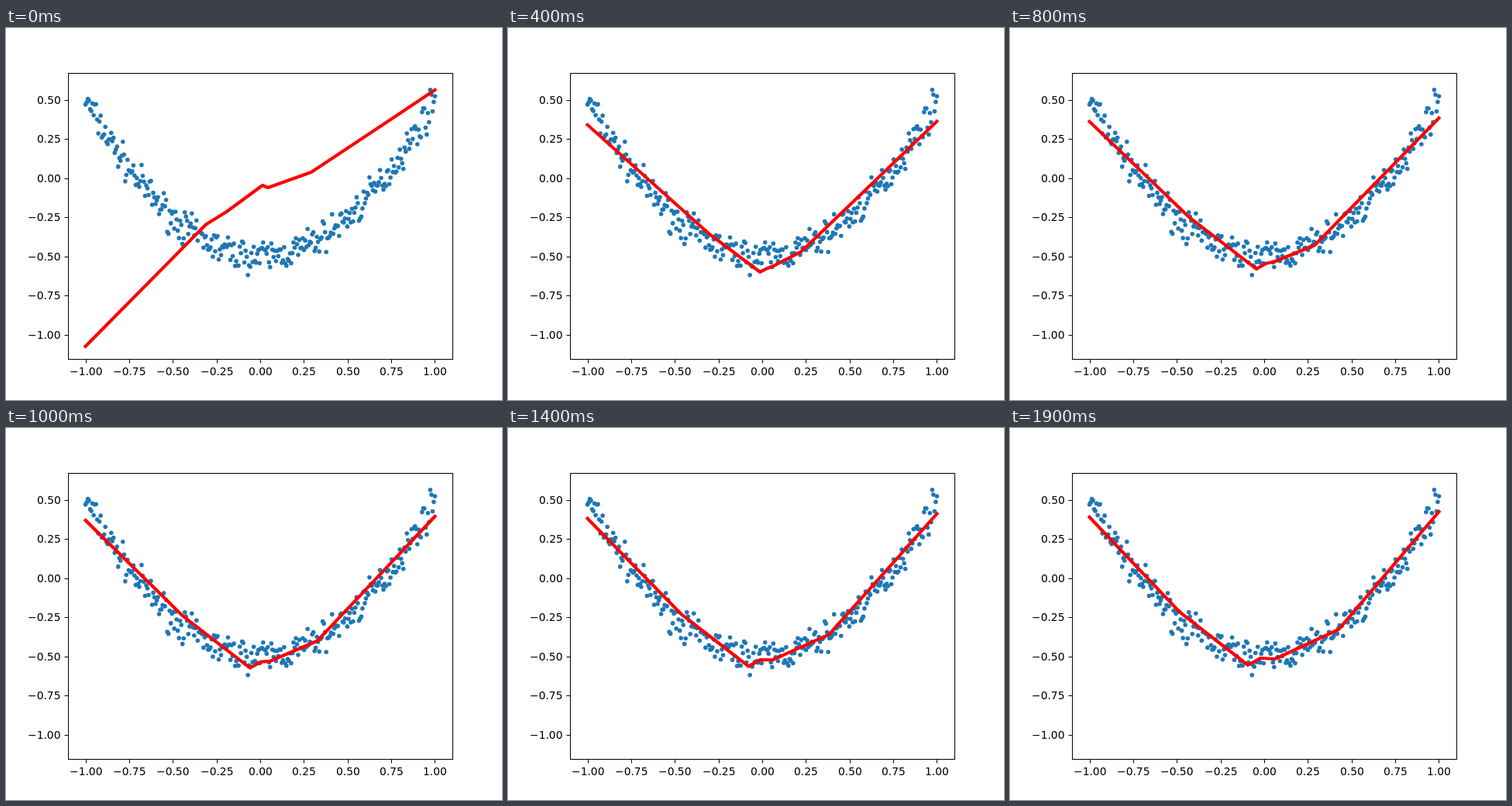
An HTML page that plays this animation: 640x480 px, repeating every 2000 ms.

```html
<!DOCTYPE html>
<html lang="en">
<head>
<meta charset="utf-8">
<title>Curve fit</title>
<style>
  html, body { margin: 0; width: 100%; height: 100%; overflow: hidden; background: #fff; }
  svg { display: block; }
  text { font: 13.89px "DejaVu Sans", sans-serif; }
  .frame { fill: none; stroke: #000; }
  .dots { fill: #1f77b4; }
  .fit { fill: none; stroke: #f00; stroke-width: 4.17; stroke-linecap: square; stroke-linejoin: round; }
</style>
</head>
<body>
<svg width="640" height="480" viewBox="0 0 640 480">
  <g class="dots"></g>
  <polyline class="fit"/>
  <g class="axes"><rect class="frame" x="80.5" y="58.5" width="496" height="369"/></g>
</svg>
<script>
const STEP = 100, LOOP = 2000, COUNT = 300;
const px = x => 328 + 225.45 * x;
const py = y => 193.9 - 202 * y;
const crisp = v => Math.round(v) + 0.5;
const find = selector => document.querySelector(selector);

function add(parent, tag, attrs, text = "") {
  const node = document.createElementNS("http://www.w3.org/2000/svg", tag);
  for (const key in attrs) node.setAttribute(key, attrs[key]);
  node.textContent = text;
  parent.append(node);
}

function drawAxes() {
  const axes = find(".axes");
  for (let v = -1; v <= 1; v += 0.25) {
    const label = v.toFixed(2).replace("-", "\u2212");
    const width = v < 0 ? 42.6 : 31;
    add(axes, "path", { class: "frame", d: `M${crisp(px(v))} 428v4.5` });
    add(axes, "text", { x: Math.round(px(v) - width / 2 + 0.4), y: 448 }, label);
    if (v > 0.5) continue;
    add(axes, "path", { class: "frame", d: `M80 ${crisp(py(v))}h-4.5` });
    add(axes, "text", { x: Math.round(70.7 - width), y: Math.round(py(v)) + 5 }, label);
  }
}

// Noisy samples of y = x² − 0.5.
function drawDots() {
  let seed = 7;
  const random = () => (seed = (seed * 16807) % 2147483647) / 2147483647;
  const noise = () => (random() + random() + random() - 1.5) * 0.1;
  for (let i = 0; i < COUNT; i++) {
    const x = -1 + 2 * i / (COUNT - 1);
    add(find(".dots"), "circle", { cx: px(x), cy: py(x * x - 0.5 + noise()), r: 2.8 });
  }
}

// Corners of the fitted line; rate sets how fast the pose is approached.
const poses = [
  { time: 0, rate: 1, left: 410.7, corners: [258, 253.5, 284, 237.5, 331, 203, 338, 206, 394, 186], right: 80 },
  { time: 200, rate: 7, left: 129, corners: [298, 296, 331, 318.5, 338, 316.5, 345, 314.5, 370, 291.5], right: 123 },
  { time: 600, rate: 1, left: 122.5, corners: [236, 247, 321.5, 312.5, 333, 306, 340, 303, 383, 287], right: 119 },
  { time: 1900, rate: 1.3, left: 115, corners: [219, 237.5, 307, 306, 323, 297, 342, 298, 424, 260], right: 108 }
];
const linePoints = pose => [px(-1), pose.left, ...pose.corners, px(1), pose.right];
const settle = (p, rate) => (1 - Math.exp(-rate * p)) / (1 - Math.exp(-rate));

function fitAt(time) {
  const next = Math.max(1, poses.findIndex(pose => pose.time >= time));
  const from = poses[next - 1], to = poses[next];
  const p = settle((time - from.time) / (to.time - from.time), to.rate);
  const target = linePoints(to);
  return linePoints(from).map((v, i) => v + (target[i] - v) * p);
}

const fit = find(".fit");
const startTime = performance.now();

function render(now) {
  const elapsed = Math.max(0, now - startTime) % LOOP;
  fit.setAttribute("points", fitAt(Math.floor(elapsed / STEP) * STEP).join(" "));
  requestAnimationFrame(render);
}

drawAxes();
drawDots();
render(startTime);
</script>
</body>
</html>
```
